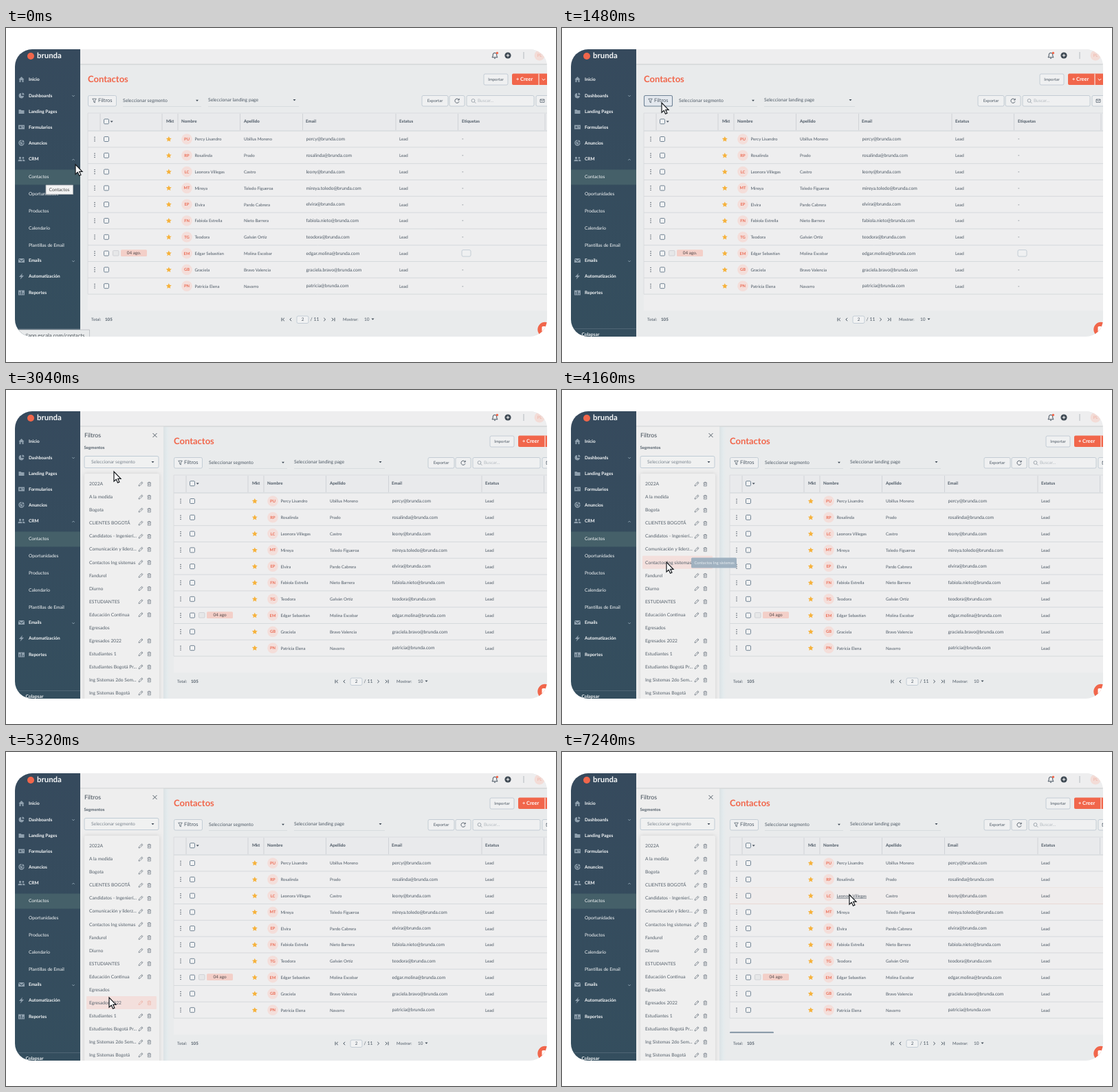
An HTML page with a canvas that plays this animation: 800x487 px, repeating every 7.28 s.

```html
<!DOCTYPE html>
<html lang="es">
<head>
<meta charset="utf-8">
<title>Contactos</title>
<style>
html, body { margin: 0; width: 800px; height: 487px; overflow: hidden; background: #fff }
canvas { display: block }
</style>
</head>
<body>
<canvas id="stage" width="800" height="487"></canvas>
<script>
const c = document.getElementById('stage').getContext('2d');
c.textRendering = 'geometricPrecision';
const LOOP = 7280, INK = '#4d5965', ORANGE = '#f1664b', EDGE = '#b9c5cf', RULE = '#d6d9dc', WHITE = '#f6f8f9';
const MAIL = '@brunda.com';

const menu = [['Inicio', 75], ['Dashboards', 98.5], ['Landing Pages', 122], ['Formularios', 144.5], ['Anuncios', 167.5],
  ['CRM', 191], ['Emails', 339], ['Automatización', 362], ['Reportes', 386]];
const menuIcons = [
  'M-4 0L0-4 4 0H3V4H1V1H-1V4H-3V0z',
  'M-.5-3.5A3.7 3.7 0 1 0 3.5.5H-.5zM1-4V-1H4A3 3 0 0 0 1-4z',
  'M-4-3H-1L0-2H4V3H-4z',
  'M-4.5-3H4.5V3H-4.5zM-3-1V1H0V-1zM1.5-1V0H3.5V-1z',
  'M0-4.2A4.2 4.2 0 1 0 4.2 0H2.8A2.8 2.8 0 1 1 0-2.8zM0-2A2 2 0 1 0 2 0H0zM1.2-4.2V-1H4.2A4 4 0 0 0 1.2-4.2z',
  'M-2-3.2A1.6 1.6 0 1 0-2 0 1.6 1.6 0 1 0-2-3.2zM2.4-3A1.4 1.4 0 1 0 2.4-.2 1.4 1.4 0 1 0 2.4-3zM-5 3.2Q-5 .8-2 .8T1 3.2zM2 3.2Q2 1.6 1.4.9 5 .4 5 3.2z',
  'M-4.5-3H4.5L0 .6zM-4.5-2V3H4.5V-2L0 1.7z',
  'M1.5-4.5L-3.5 1H-.5L-2 4.8 3.5-1H.5z',
  'M-4.5-3.5H4.5V3.5H-4.5zM-3-1V2.5H-2V-1zM-.5-2.5V2.5H.5V-2.5zM2 0V2.5H3V0z'
];
const submenu = ['Contactos', 'Oportunidades', 'Productos', 'Calendario', 'Plantillas de Email'];
const segments = ['2022A', 'A la medida', 'Bogota', 'CLIENTES BOGOTÁ', 'Candidatos - Ingenierí...', 'Comunicación y liderz...',
  'Contactos Ing sistemas', 'Fandurel', 'Diurno', 'ESTUDIANTES', 'Educación Continua', 'Egresados', 'Egresados 2022',
  'Estudiantes 1', 'Estudiantes Bogotá Pr...', 'Ing Sistemas 2do Sem...', 'Ing Sistemas Bogotá'];
const people = [
  ['Percy Lisandro', 'Ubillus Moreno', 'percy'], ['Rosalinda', 'Prado', 'rosalinda'],
  ['Leonora Villegas', 'Castro', 'leony'], ['Mireya', 'Toledo Figueroa', 'mireya.toledo'],
  ['Elvira', 'Pardo Cabrera', 'elvira'], ['Fabiola Estrella', 'Nieto Barrera', 'fabiola.nieto'],
  ['Teodora', 'Galván Ortiz', 'teodora'], ['Edgar Sebastian', 'Molina Escobar', 'edgar.molina'],
  ['Graciela', 'Bravo Valencia', 'graciela.bravo'], ['Patricia Elena', 'Navarro', 'patricia']];

// Pointer stops: time, x, y
const stops = [[0, 101, 199], [180, 101, 199], [1100, 145, 109], [2350, 145, 109], [2850, 157, 119], [3300, 157, 119],
  [4000, 152, 251], [4400, 152, 251], [5150, 150, 358], [5650, 150, 358], [6040, 200, 346], [6160, 200, 346],
  [6920, 418, 208], [LOOP, 418, 208]];

const ramp = (t, a, b) => Math.min(1, Math.max(0, (t - a) / (b - a)));
const ease = k => k * k * (3 - 2 * k);

function pointer(t) {
  const i = stops.findIndex(s => s[0] > t);
  const [t0, x0, y0] = stops[i - 1], [t1, x1, y1] = stops[i];
  const k = ease(ramp(t, t0, t1));
  return [x0 + (x1 - x0) * k, y0 + (y1 - y0) * k];
}
function text(s, x, y, size = 6.7, color = INK, weight = 400, align = 'left') {
  c.font = `${weight} ${size}px Lato, sans-serif`;
  c.textAlign = align;
  c.textBaseline = 'middle';
  c.fillStyle = color;
  c.fillText(s, x, y + .2);
}
function box(x, y, w, h, r, fill, stroke, width = .8) {
  c.beginPath();
  c.roundRect(x, y, w, h, r);
  if (fill) { c.fillStyle = fill; c.fill(); }
  if (stroke) { c.strokeStyle = stroke; c.lineWidth = width; c.stroke(); }
}
function shape(d, x, y, fill, stroke, width = .8) {
  const path = new Path2D(d);
  c.save();
  c.translate(x, y);
  if (fill) { c.fillStyle = fill; c.fill(path, 'evenodd'); }
  if (stroke) { c.strokeStyle = stroke; c.lineWidth = width; c.stroke(path); }
  c.restore();
}
const disc = (x, y, r, fill) => box(x - r, y - r, 2 * r, 2 * r, r, fill);
const line = (x0, y0, x1, y1, color = RULE, width = 1) => shape(`M${x0} ${y0}L${x1} ${y1}`, 0, 0, null, color, width);
const caret = (x, y) => shape('M-2-1H2L0 1.3z', x, y, '#3d4854');
const check = (x, y) => box(x - 3.5, y - 3.5, 7, 7, 1.3, '#f1f2f3', '#64788a', .9);
function shifted(dx, fn) {
  c.save();
  c.translate(dx, 0);
  fn();
  c.restore();
}

function topBar() {
  box(108, 31, 692, 22, 0, '#eeeeef');
  line(108, 53, 800, 53, '#d5d7d9', 1.4);
  shape('M-4 2.8H4L2.8 1V-1A2.8 2.8 0 0 0-2.8-1V1zM-1 4.2H1', 711, 40, null, '#45525f', 1);
  disc(714.4, 36.4, 1.7, ORANGE);
  disc(730, 40, 4.6, '#3e4953');
  shape('M-2.3 0H2.3M0-2.3V2.3', 730, 40, null, '#fff', 1);
  line(753, 35, 753, 45, '#b3b8bd');
  disc(776, 40, 7.5, '#f3dcd7');
  text('PL', 776, 40, 6, '#efb0a3', 400, 'center');
}

function actions() {
  box(695, 67, 35, 16, 2, '#eff0f1', EDGE);
  text('Importar', 712.5, 75, 5.9, INK, 400, 'center');
  box(736, 66.5, 60, 16.5, 2, ORANGE);
  text('+ Creer', 742, 74.5, 7.4, '#fff', 700);
  line(775, 66.5, 775, 83, '#f7c4b8', 1.6);
  shape('M-2.3-1L0 1.3 2.3-1', 782, 75, null, '#fff', 1);
  box(605, 98.5, 38, 15.5, 2, '#eff0f1', EDGE);
  text('Exportar', 624, 106.3, 6, INK, 400, 'center');
  box(645, 98.5, 22, 15.5, 2, '#eff0f1', EDGE);
  shape('M2.7-1.6A3.1 3.1 0 1 0 3 1M3.2-3.4V-1.2H1', 656, 106.2, null, '#4d5965', .9);
  box(670, 98.5, 98, 15.5, 2, '#eff0f1', EDGE);
  shape('M-.5-3A2.4 2.4 0 1 0-.5 1.8 2.4 2.4 0 1 0-.5-3M1.3 1.2L3.3 3.2', 680, 106.5, null, '#8c969f', .8);
  text('Buscar...', 686, 106.3, 6.4, '#b4bac0');
  box(771, 98.5, 25, 15.5, 2, '#eff0f1', EDGE);
  shape('M-3-2H3V2.4H-3zM-3-2L0 .6 3-2', 780, 106, null, '#5a6672', .8);
}

function toolbar(hot) {
  text('Contactos', 119, 74.5, 13, ORANGE, 700);
  box(119.5, 98.5, 41, 15.5, 2, hot ? '#e3e8ee' : '#eff0f1', hot ? '#6f8396' : EDGE, hot ? 1.1 : .8);
  shape('M-2.8-2.8H2.8L.8 0V3L-.8 2V0z', 128.5, 106, null, '#5a6672', .8);
  text('Filtros', 134, 105.8, 7.5);
  text('Seleccionar segmento', 170, 105.7, 6.8);
  text('Seleccionar landing page', 294, 104.6, 6.8);
  caret(278, 105.7);
  caret(419.5, 105);
  line(170, 114.5, 284, 114.5, '#d5d9dc', .8);
  line(294, 114.5, 426, 114.5, '#d5d9dc', .8);
}

function table(open, hot, linked) {
  box(119, 124, 700, 288, 0, '#eeeeef');
  box(119, 124, 700, 26, 0, '#e9eaec');
  line(119, 124, 819, 124, RULE, .8);
  line(119, 150, 819, 150, '#cfd3d6');
  line(119, 124, 119, 388, RULE, .8);
  for (const x of [137, 227, 250, 340.5, 431.5, 567, 657.5, 784]) line(x, 125, x, 149, '#cdd1d5', .9);
  check(146, 136.3);
  caret(153.7, 136.5);
  const heads = [['Mkt', 233], ['Nombre', 255], ['Apellido', 346], ['Email', 436], ['Estatus', 572], ['Etiquetas', 663]];
  for (const [s, x] of heads) text(s, x, 136.3, 6.2, INK, 700);

  people.forEach(([first, last, user], i) => {
    const y = 162 + 23.8 * i;
    if (i === hot) box(119, y - 12, 700, 23.8, 0, '#efecec');
    line(119, y + 11.9, 819, y + 11.9, i === hot || i === hot - 1 ? '#e8d9d4' : RULE);
    for (const d of [-2.8, 0, 2.8]) disc(129, y + d, .75, '#4b5661');
    check(146, y);
    shape('M0-4L1.2-1.4 4-1.1 1.9.8 2.5 3.6 0 2.2-2.5 3.6-1.9.8-4-1.1-1.2-1.4z', 236.8, y, '#f6b23c');
    disc(263, y, 7.8, '#f4deda');
    text(first[0] + last[0], 263, y, 5.8, '#ea6a52', 700, 'center');
    text(first, 274.5, y + .3, 6.1);
    if (i === linked) line(274.5, y + 3.6, 274.5 + c.measureText(first).width, y + 3.6, INK, .7);
    text(last, 346, y + .3, 6.1);
    text(user + MAIL, 436.5, y, 6.7);
    text('Lead', 572, y + .3, 6.2);
    if (i !== 7) return text('-', 663, y, 7);
    box(155.5, y - 4, 8.5, 7.5, 1, '#e6e7e8', '#c9ccd0');
    box(167, y - 5.3, 38, 9.6, 1.5, '#f3cfc8');
    text(open ? '04 ago' : '04 ago.', 186, y - .7, 6.4, '#544a4c', 400, 'center');
    box(663, y - 5, 13, 9.5, 2, '#eff0f1', EDGE);
  });
  text('Total:', 124, 425, 6);
  text('105', 144, 425, 6.2, INK, 700);
}

function pager() {
  const chevron = (x, s) => shape(`M${s} -2.2L${-s} 0 ${s} 2.2`, x, 425, null, '#4d5965', 1);
  line(401, 422.5, 401, 427.5, '#4d5965', 1);
  chevron(403.7, 1.2);
  chevron(414, 1.2);
  box(423, 420, 17, 10.5, 2, '#f1f2f3', EDGE);
  text('2', 431.5, 425.3, 6.4, INK, 400, 'center');
  text('/ 11', 442.5, 424.8, 7);
  chevron(463.5, -1.2);
  chevron(475, -1.2);
  line(478, 422.5, 478, 427.5, '#4d5965', 1);
  text('Mostrar:', 490, 425, 6);
  text('10', 521, 425.3, 6.5);
  caret(533.5, 424.5);
}

function panel(hot) {
  const glow = c.createLinearGradient(229, 0, 240, 0);
  glow.addColorStop(0, '#dbe2e5');
  glow.addColorStop(.5, '#e4ebed');
  glow.addColorStop(1, '#e9ebec00');
  box(229, 54, 11, 396, 0, glow);
  box(108, 53.5, 121, 397, 0, '#eeeeee');
  text('Filtros', 114, 66.5, 8.8, '#3f4a55');
  shape('M-3-3L3 3M3-3L-3 3', 216.5, 66, null, '#56616b', 1);
  text('Segmentos', 113.5, 83.5, 6.1, '#55616c', 700);
  box(114, 96.5, 108, 17, 2, '#f0f1f1', '#b4c2ce');
  text('Seleccionar segmento', 124, 104.6, 6.7, '#7b858f');
  caret(213.5, 105);
  c.save();
  c.shadowColor = '#0002';
  c.shadowBlur = 5;
  box(114, 122, 109, 340, 2, '#efefef');
  c.restore();
  segments.forEach((s, i) => {
    const y = 137 + 19.05 * i, tint = i === hot ? '#eeb3a8' : '#737d87';
    if (i === hot) box(117, y - 9.5, 102, 19, 1, '#f3dfdc');
    text(s, 121, y, 6.7, '#55606b');
    if (s === 'Egresados') return;
    shape('M-3 3L-2.5 1 1.6-3 3-1.6-1 2.5zM.6-2L2-.6', 196, y, null, tint, .8);
    shape('M-2.7-2H2.7M-1-2V-3H1V-2M-2-2V2.8H2V-2M-.7-.6V1.5M.7-.6V1.5', 208.3, y + .3, null, tint, .7);
  });
}

function sidebar() {
  const shade = c.createLinearGradient(0, 31, 0, 450);
  shade.addColorStop(0, '#364a5d');
  shade.addColorStop(1, '#344e5e');
  box(13, 31, 95, 420, 0, shade);
  disc(36, 41, 5, ORANGE);
  text('brunda', 45, 40.6, 11.4, WHITE, 700);
  box(13, 206.5, 95, 22, 0, '#456069');
  menu.forEach(([s, y], i) => {
    shape(menuIcons[i], 22.5, y, '#8fa0ae');
    text(s, 33, y, 6.5, WHITE, 700);
  });
  for (const [y, s] of [[99, 1], [192, -1], [340, 1]]) shape(`M-1.8 ${-s}L0 ${s} 1.8 ${-s}`, 98, y, null, '#8fa3b2', .8);
  submenu.forEach((s, i) => text(s, 33, 217 + 25 * i, 6.6, WHITE));
  line(13, 438.5, 108, 438.5, '#566b7a', .8);
  text('Colapsar', 28.5, 446.8, 6.7, WHITE, 700);
}

function draw(t) {
  const [x, y] = pointer(t);
  const open = ease(ramp(t, 2380, 2640)), dx = 125 * open;
  const inTable = open === 1 && x > 244;
  const row = inTable ? Math.floor((y - 150) / 23.8) : -1;
  const overName = row === 2 && x > 399 && x < 445;
  let segment = open === 1 && x > 117 && x < 219 && y > 127.5 ? Math.floor((y - 127.5) / 19.05) : -1;
  if (t > 5000 && t < 6300) segment = 12;

  c.fillStyle = '#fff';
  c.fillRect(0, 0, 800, 487);
  c.save();
  c.beginPath();
  c.roundRect(13, 31, 774, 419, 25);
  c.clip();
  box(13, 31, 774, 419, 0, '#e9ebec');
  shifted(dx, () => {
    toolbar(t > 950 && t < 2380);
    table(open > 0, row, overName ? row : -1);
  });
  shifted(9 * open, actions);
  shifted(78 * open, pager);
  if (inTable) box(244, 407.7, 64, 2.4, 1.2, '#8c9cab');
  topBar();
  if (open) shifted(-132 * (1 - open), () => panel(segment));
  sidebar();
  disc(784, 439.5, 10.7, ORANGE);
  box(779.5, 435, 9, 8, 1.5, '#fff');

  if (t < 480) {
    box(0, 440, 121.5, 20, 0, '#e8eaeb', '#b8bcc0');
    text('//app.escala.com/contacts', 27, 448, 7.7, '#4f565d');
  }
  if (t < 260) {
    box(58, 229, 39.5, 13.5, 0, '#f3f3f3', '#a9adb2');
    text('Contactos', 62.5, 235.8, 6.7, '#444');
  }
  c.globalAlpha = ramp(t, 4040, 4140) * (1 - ramp(t, 4380, 4460));
  if (c.globalAlpha) {
    box(188, 244.5, 66, 15, 1.5, '#9cafbff0');
    text(segments[6], 192.5, 252, 5.8, '#e8eef2');
  }
  c.globalAlpha = 1;
  shape('M0 0V14.2L3.3 11.2 5.5 16.2 7.9 15.1 5.7 10.3H10z', x, y, '#fff', '#15191d', 1.2);
  c.restore();
}

function tick() {
  draw(performance.now() % LOOP);
  requestAnimationFrame(tick);
}
tick();
</script>
</body>
</html>
```
